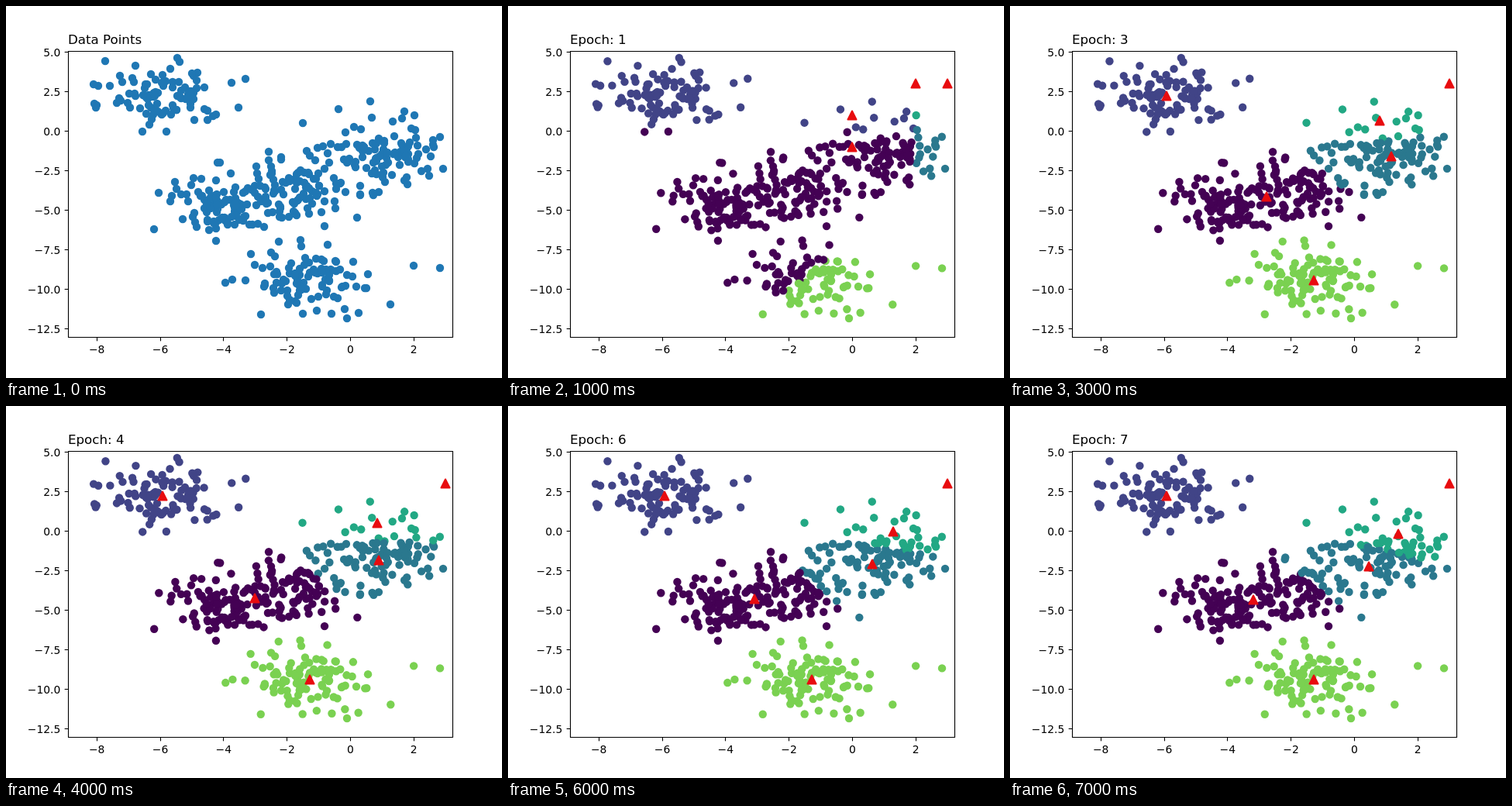
These frames come from a looping animation (640 px wide and 480 px high, 8 s). An HTML page:

```html
<!DOCTYPE html>
<html lang="en">
<head>
<meta charset="utf-8">
<title>Clustering</title>
<style>
  html, body { margin: 0; width: 100%; height: 100%; overflow: hidden; background: #fff; }
  svg { display: block; width: 640px; height: 480px; }
  text { font-family: "DejaVu Sans", sans-serif; font-size: 13.89px; fill: #000; }
  #title { font-size: 16.67px; }
  #axes path { fill: none; stroke: #000; stroke-width: 1.11; }
</style>
</head>
<body>
<svg viewBox="0 0 640 480">
  <clipPath id="box"><rect x="80" y="57.6" width="496" height="369.6"/></clipPath>
  <rect width="640" height="480" fill="#fff"/>
  <g clip-path="url(#box)">
    <g id="dots"></g>
    <g id="marks" fill="#e80c0f" stroke="#e80c0f" stroke-width="2.08" stroke-linejoin="round"></g>
  </g>
  <g id="axes"></g>
  <text id="title" x="80" y="49.3"></text>
</svg>
<script>
const STEP = 1000, FRAMES = 8, PER_BLOB = 100, BLOBS = 5;
const BASE = '#1f77b4';
const COLORS = ['#440154', '#414487', '#2a788e', '#22a884', '#7ad151', '#fde725'];
const START = [[0, -1], [0, 1], [4, -1], [2, 3], [5, -4], [3, 3]];
const $ = id => document.getElementById(id);

function add(parent, tag, attrs, text) {
  const el = document.createElementNS('http://www.w3.org/2000/svg', tag);
  for (const k in attrs) el.setAttribute(k, attrs[k]);
  if (text !== undefined) el.textContent = text;
  return parent.appendChild(el);
}

// Mersenne Twister with uniform, normal and bounded integer draws
function makeRandom(seed) {
  const N = 624, s = new Uint32Array(N);
  let pos = N, spare = null;
  s[0] = seed;
  for (let i = 1; i < N; i++) s[i] = Math.imul(1812433253, s[i - 1] ^ (s[i - 1] >>> 30)) + i;

  function next() {
    if (pos === N) {
      for (let i = 0; i < N; i++) {
        const y = (s[i] & 0x80000000) | (s[(i + 1) % N] & 0x7fffffff);
        s[i] = s[(i + 397) % N] ^ (y >>> 1) ^ (y & 1 ? 0x9908b0df : 0);
      }
      pos = 0;
    }
    let y = s[pos++];
    y ^= y >>> 11;
    y ^= (y << 7) & 0x9d2c5680;
    y ^= (y << 15) & 0xefc60000;
    return (y ^ (y >>> 18)) >>> 0;
  }

  function uniform(lo, hi) {
    const a = next() >>> 5, b = next() >>> 6;
    return lo + (hi - lo) * (a * 67108864 + b) / 9007199254740992;
  }

  function normal() {
    if (spare !== null) {
      const v = spare;
      spare = null;
      return v;
    }
    let x, y, r;
    do {
      x = uniform(-1, 1);
      y = uniform(-1, 1);
      r = x * x + y * y;
    } while (r >= 1 || r === 0);
    const f = Math.sqrt(-2 * Math.log(r) / r);
    spare = f * x;
    return f * y;
  }

  function below(max) {
    const mask = 2 ** (32 - Math.clz32(max)) - 1;
    let v;
    do v = next() & mask; while (v > max);
    return v;
  }
  return { uniform, normal, below };
}

function makeBlobs() {
  const rnd = makeRandom(2), pts = [];
  const mids = Array.from({ length: BLOBS }, () => [rnd.uniform(-10, 10), rnd.uniform(-10, 10)]);
  for (const [x, y] of mids)
    for (let i = 0; i < PER_BLOB; i++) pts.push([x + rnd.normal(), y + rnd.normal()]);
  for (let i = pts.length - 1; i > 0; i--) {
    const j = rnd.below(i);
    [pts[i], pts[j]] = [pts[j], pts[i]];
  }
  return pts;
}

function nearest(p, centers) {
  const d = centers.map(c => Math.hypot(p[0] - c[0], p[1] - c[1]));
  return d.indexOf(Math.min(...d));
}

function moveCenters(centers, labels) {
  return centers.map((c, k) => {
    const own = points.filter((p, i) => labels[i] === k);
    return own.length ? [0, 1].map(a => own.reduce((sum, p) => sum + p[a], 0) / own.length) : c;
  });
}

const points = makeBlobs();
const epochs = [];
for (let e = 1, centers = START; e < FRAMES; e++) {
  const labels = points.map(p => nearest(p, centers));
  epochs.push({ centers, labels });
  centers = moveCenters(centers, labels);
}

const range = a => {
  const v = points.map(p => p[a]);
  return [1.1 * Math.min(...v), 1.1 * Math.max(...v)];
};
const [x0, x1] = range(0), [y0, y1] = range(1);
const px = x => 80 + 496 * (x - x0) / (x1 - x0);
const py = y => 427.2 - 369.6 * (y - y0) / (y1 - y0);

const dots = points.map(() => add($('dots'), 'circle', { r: 5.2 }));
const marks = START.map(() => add($('marks'), 'path', { d: 'M0-5.5L5.5 5.5H-5.5Z' }));

function drawAxes() {
  const g = $('axes'), snap = v => Math.floor(v) + 0.5;
  const label = v => String(v).replace('-', '\u2212');
  add(g, 'path', { d: 'M80.5 58.5H576.5V427.5H80.5Z' });
  for (let v = -8; v <= 2; v += 2) {
    add(g, 'path', { d: `M${snap(px(v))} 427.5v4.86` });
    add(g, 'text', { x: px(v), y: 447.7, 'text-anchor': 'middle' }, label(v));
  }
  for (let v = -12.5; v <= 5; v += 2.5) {
    add(g, 'path', { d: `M80.5 ${snap(py(v))}h-4.86` });
    add(g, 'text', { x: 70.3, y: py(v) + 5.2, 'text-anchor': 'end' }, label(v.toFixed(1)));
  }
}

let shown = -1;
function show(n) {
  if (n === shown) return;
  shown = n;
  const state = epochs[n - 1];
  $('title').textContent = state ? 'Epoch: ' + n : 'Data Points';
  $('marks').style.display = state ? '' : 'none';
  dots.forEach((dot, i) => {
    const x = px(points[i][0]), y = py(points[i][1]);
    dot.setAttribute('cx', state ? x : Math.round(x));
    dot.setAttribute('cy', state ? y : Math.round(y));
    dot.setAttribute('fill', state ? COLORS[state.labels[i]] : BASE);
  });
  if (state) marks.forEach((m, k) => {
    const [x, y] = state.centers[k];
    m.setAttribute('transform', `translate(${Math.round(px(x))} ${Math.round(py(y))})`);
  });
}

function tick() {
  show(Math.floor(performance.now() / STEP) % FRAMES);
  requestAnimationFrame(tick);
}

drawAxes();
show(0);
tick();
</script>
</body>
</html>
```
